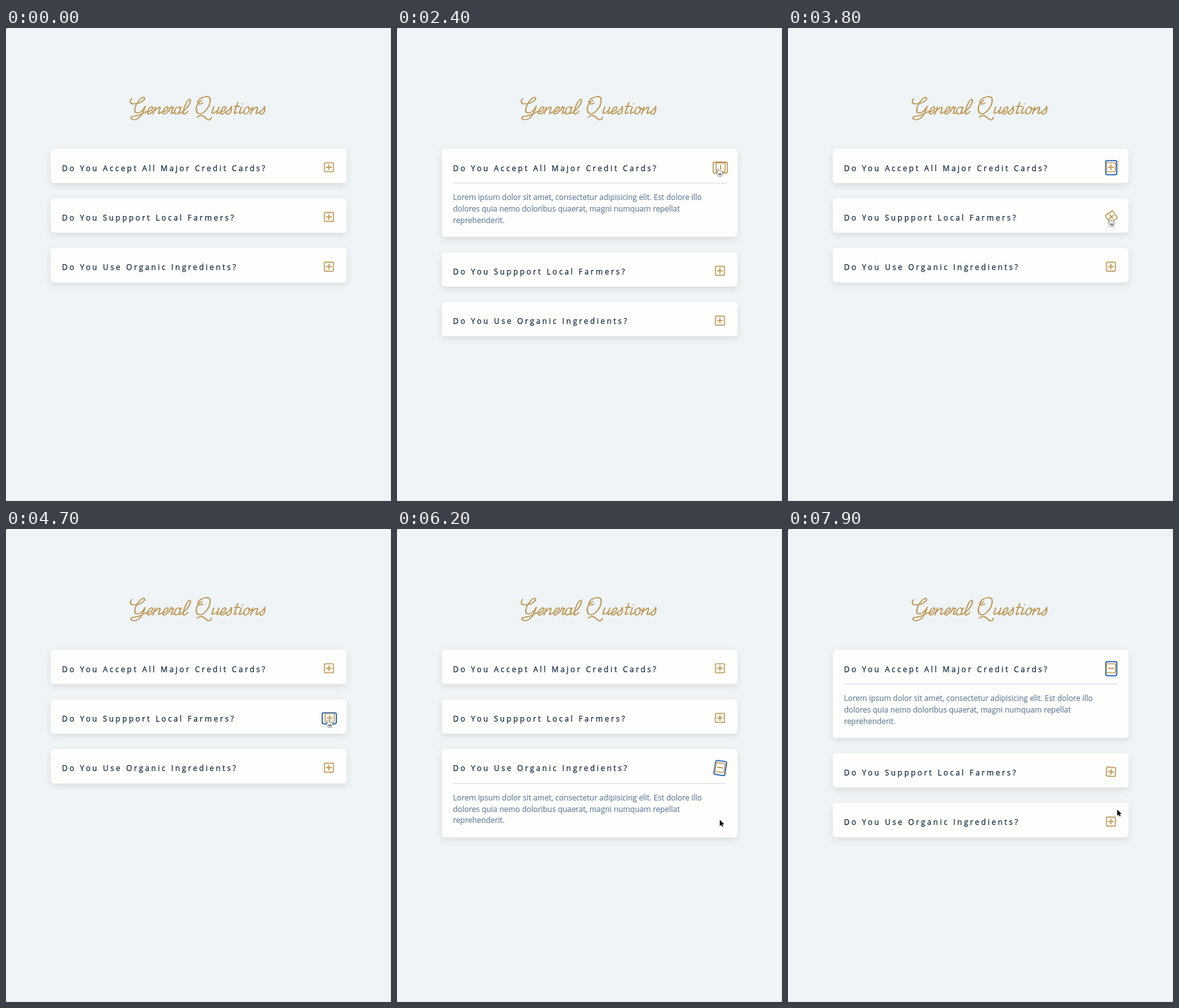
Animation of 600x737 px, one loop 8000 ms. Source, as an HTML page with a canvas:

```html
<!DOCTYPE html>
<html lang="en">
<head>
<meta charset="utf-8">
<title>General Questions</title>
<style>
  html, body { margin: 0; width: 100%; height: 100%; overflow: hidden; background: #eff4f7; }
  canvas { display: block; }
</style>
</head>
<body>
<canvas id="stage" width="600" height="737" role="img" aria-label="General Questions"></canvas>
<script>
const ctx = document.getElementById('stage').getContext('2d');
const LOOP = 8000, FADE = 300;
const LEFT = 87.3, TOP = 188, SHUT = 53.6, OPEN = 137.6, GAP = 23.8;
const GOLD = [193, 157, 94], BLUE = [28, 97, 184];
const gold = `rgb(${GOLD})`;

const questions = [
  'Do You Accept All Major Credit Cards?',
  'Do You Suppport Local Farmers?',
  'Do You Use Organic Ingredients?'
];
const answer = [
  'Lorem ipsum dolor sit amet, consectetur adipisicing elit. Est dolore illo',
  'dolores quia nemo doloribus quaerat, magni numquam repellat',
  'reprehenderit.'
];

// Each click toggles its card and closes the others
const clicks = [
  { at: 2400, card: 0 }, { at: 2800, card: 0 },
  { at: 4100, card: 1 }, { at: 4700, card: 1 }, { at: 5200, card: 1 },
  { at: 6000, card: 2 }, { at: 6740, card: 0 }
];
// Pointer moves: leaves, arrives, x, y
const moves = [
  [300, 800, 463, 246], [1300, 2250, 500.5, 219], [3050, 3500, 511, 310],
  [3640, 3780, 502, 297], [5600, 5850, 503, 453], [6420, 6620, 505, 219],
  [7150, 7900, 513, 437]
];

const clamp = v => Math.max(0, Math.min(1, v));
const ease = v => 1 - Math.pow(1 - clamp(v), 2.2);
const smooth = v => v * v * (3 - 2 * v);
const mix = (a, b, k) => a + (b - a) * k;

function openCard(t) {
  let open = -1;
  for (const c of clicks) if (c.at <= t) open = open === c.card ? -1 : c.card;
  return open;
}

function cardTop(i, t) {
  const open = openCard(t);
  return TOP + i * (SHUT + GAP) + (open >= 0 && open < i ? OPEN - SHUT : 0);
}

function pointer(t) {
  let x = 440, y = -14;
  for (const [from, to, nx, ny] of moves) {
    const k = smooth(clamp((t - from) / (to - from)));
    x = mix(x, nx, k);
    y = mix(y, ny, k);
  }
  return { x, y };
}

function over(i, t) {
  const p = pointer(t);
  return Math.abs(p.x - 503.8) < 9 && Math.abs(p.y - cardTop(i, t) - 29.6) < 11;
}

// Hover state of the last moments, weighted by the easing curve
function turn(i, t) {
  const steps = 20;
  let sum = 0;
  for (let n = 0; n < steps; n++)
    if (over(i, t - (n + 0.5) / steps * FADE)) sum += ease((n + 1) / steps) - ease(n / steps);
  return sum * Math.PI / 2;
}

// Script lettering built from a few shared strokes, baseline at 0
const stem = (x, h = 11) => `M${x} ${-h}V-3q.5 5 4 0`;
const bowl = (x, w) => `M${x + w}-5.5a${w / 2} 5.5 0 1 0 ${-w} 0a${w / 2} 5.5 0 1 0 ${w} 0`;
const arch = (x, w) => `M${x}-4q${w * 0.9}-11 ${w}-4`;
const cup = (x, w) => `M${x}-11V-3q1 5 ${w}-3`;
const loop = h => `M0-3C9 ${-h * 0.4} 9 ${-h} 5 ${-h}C1 ${-h} 0 0 4 0Q7 0 9-4`;
const letters = {
  e: [10, loop(11)],
  l: [9, loop(23)],
  n: [14, 'M1-11V0' + arch(1, 8) + stem(9, 8)],
  r: [9, 'M0-4L2-12q1 3 4 2' + stem(5, 10)],
  a: [12, bowl(0, 8) + stem(8)],
  u: [13, cup(1, 8) + stem(9)],
  s: [10, 'M0-3Q5-7 5-12Q9-3 6-.5T1-2'],
  t: [9, stem(3, 18) + 'M0-12h8'],
  i: [7, stem(2) + 'M2-16h.3'],
  o: [12, bowl(1, 8) + 'M6-11q1 4 6 3']
};
const capG = 'M196 110q-5 5 0 8q12 2 20-7q0-6-7 0q-10 11-8 20q8 5 16-9q-6 20-17 21q-8-1-4-5q12-1 23-8';
const capQ = 'M305 113q-12 8-7 19q8 6 18-10q6-16-4-15q-10 1-13 8q0 6 8 2m-9 22q6-6 13 1t9-1';

const title = new Path2D(capG + capQ);
function addWord(word, x) {
  for (const ch of word) {
    const [advance, strokes] = letters[ch];
    title.addPath(new Path2D(strokes), new DOMMatrix([1, 0, -0.35, 1, x, 134]));
    x += advance;
  }
}
addWord('eneral', 218);
addWord('uestions', 319);

const arrow = new Path2D('M0 0V10L2 8L4 11L5.5 10L4 7H7Z');
const hand = new Path2D('M-1 1Q0-1 1 1V4Q6 4 7 6L5 12H0L-3 7Q-3 6-1 7Z');

function box(x, y, w, h, r) {
  ctx.beginPath();
  ctx.roundRect(x, y, w, h, r);
}

// A flat nib: the same strokes laid side by side
function drawTitle() {
  ctx.strokeStyle = gold;
  ctx.lineWidth = 1.2;
  ctx.lineCap = ctx.lineJoin = 'round';
  for (const d of [-0.5, 0, 0.5]) {
    ctx.save();
    ctx.translate(d, -d * 0.3);
    ctx.stroke(title);
    ctx.restore();
  }
}

function drawButton(i, y, t, isOpen) {
  ctx.save();
  ctx.translate(503.8, y + 29.6);
  ctx.rotate(turn(i, t));
  const click = clicks.filter(c => c.at <= t).pop();
  if (click && click.card === i) {
    const first = clicks.find(c => c.card === i && c.at > click.at - 1200);
    const k = ease((t - first.at) / FADE);
    ctx.strokeStyle = `rgb(${GOLD.map((c, n) => Math.round(mix(c, BLUE[n], k)))})`;
    ctx.lineWidth = 1.8;
    box(-8.6, -11, 17.2, 22, 2.5);
    ctx.stroke();
  }
  ctx.translate(-0.5, -0.6);
  ctx.strokeStyle = ctx.fillStyle = gold;
  ctx.lineWidth = 1.7;
  box(-7, -7, 14, 14, 1.2);
  ctx.stroke();
  ctx.fillRect(-4.5, -0.95, 9, 1.9);
  if (!isOpen) ctx.fillRect(-0.95, -4.5, 1.9, 9);
  ctx.restore();
}

function write(text, y, color, spacing, weight) {
  ctx.font = '11.92px "Open Sans", sans-serif';
  ctx.letterSpacing = spacing + 'px';
  ctx.fillStyle = ctx.strokeStyle = color;
  ctx.lineWidth = weight;
  ctx.fillText(text, LEFT, y);
  ctx.strokeText(text, LEFT, y);
}

function drawCard(i, t) {
  const y = cardTop(i, t), isOpen = openCard(t) === i;
  ctx.save();
  ctx.shadowColor = 'rgba(0,0,0,.1)';
  ctx.shadowBlur = 11;
  ctx.shadowOffsetY = 3.7;
  ctx.fillStyle = '#fefefd';
  box(69.8, y, 461, isOpen ? OPEN : SHUT, 5);
  ctx.fill();
  ctx.restore();

  write(questions[i], y + 34.5, '#102a42', 3.01, 0.25);
  if (isOpen) {
    ctx.fillStyle = '#d2d7dc';
    ctx.fillRect(87.5, y + 53.3, 426, 1);
    answer.forEach((line, n) => write(line, y + 79.8 + n * 17.9, '#617d98', 0, 0.15));
  }
  drawButton(i, y, t, isOpen);
}

function drawPointer(t) {
  const { x, y } = pointer(t);
  const hot = questions.some((_, i) => over(i, t));
  const shape = hot ? hand : arrow;
  ctx.save();
  ctx.translate(x, y);
  ctx.lineWidth = 1;
  ctx.fillStyle = hot ? '#fff' : '#111';
  ctx.strokeStyle = hot ? '#222' : '#fff';
  ctx.stroke(shape);
  ctx.fill(shape);
  if (hot) {
    ctx.lineWidth = 0.6;
    for (let n = 1; n < 5; n += 1.6) ctx.strokeRect(n, 8, 0, 2);
  }
  ctx.restore();
}

function draw(t) {
  ctx.fillStyle = '#eff4f7';
  ctx.fillRect(0, 0, 600, 737);
  ctx.fillStyle = '#dde2e6';
  ctx.fillRect(599, 0, 1, 737);
  ctx.fillRect(0, 736, 600, 1);
  ctx.fillStyle = '#222';
  ctx.fillRect(0, 0, 1, 1);
  drawTitle();
  questions.forEach((_, i) => drawCard(i, t));
  drawPointer(t);
}

function tick(now) {
  draw(now % LOOP);
  requestAnimationFrame(tick);
}
draw(0);
requestAnimationFrame(tick);
</script>
</body>
</html>
```
